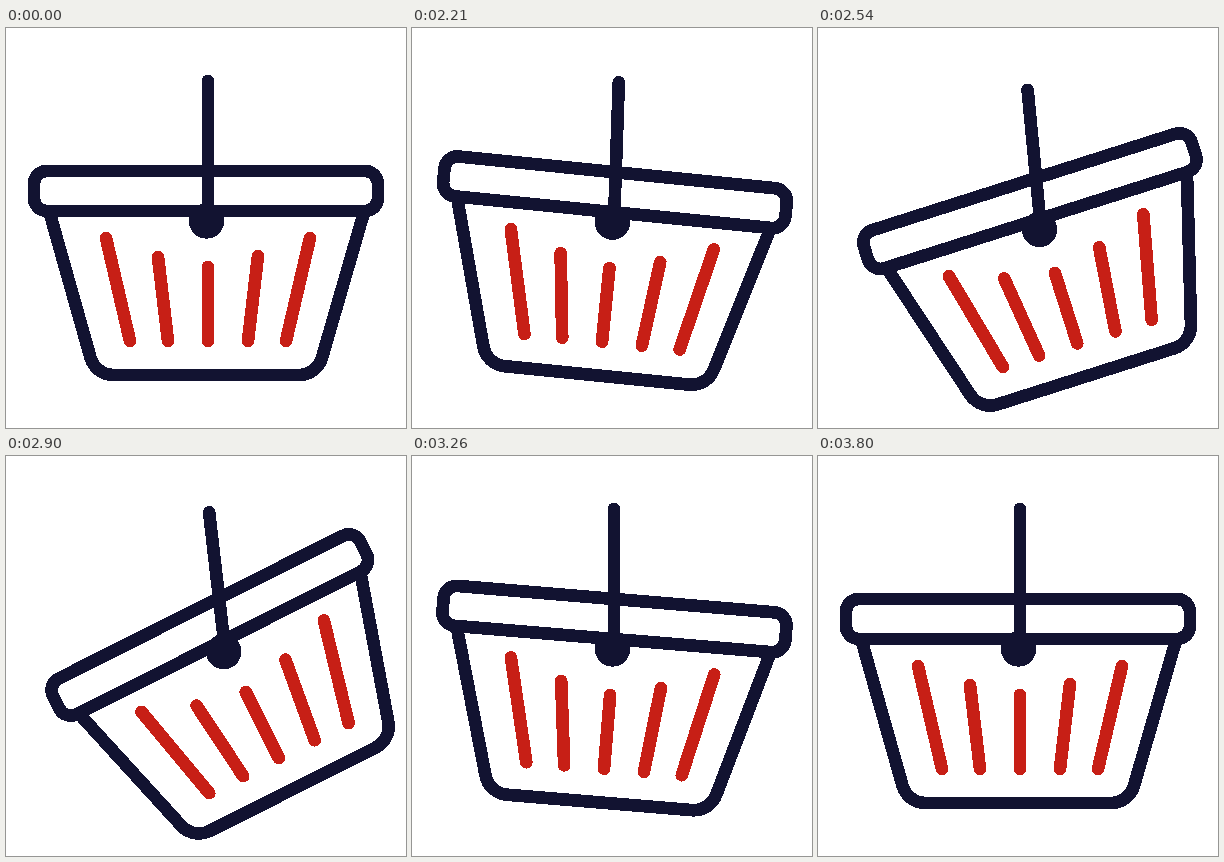
These frames come from a looping animation (400x400 px, 3830 ms). An HTML page:

```html
<!DOCTYPE html>
<html lang="en">
<head>
<meta charset="utf-8">
<title>Swinging basket</title>
<style>
  html, body { margin: 0; width: 100%; height: 100%; overflow: hidden; background: #fff; }
  svg { display: block; width: 100vw; height: 100vh; shape-rendering: crispEdges; }
  .line { fill: none; stroke: #121331; stroke-width: 12.7; stroke-linecap: round; stroke-linejoin: round; }
  .slat { stroke: #c71f16; }
</style>
</head>
<body>
<svg viewBox="0 0 400 400">
  <g id="whole">
    <g id="basket">
      <path class="line" d="M44 186 L84.5 329.7 A24 24 0 0 0 107.5 347 H293 A24 24 0 0 0 316 329.7 L357.5 186"/>
      <rect class="line" x="28" y="143" width="344" height="40" rx="13"/>
      <path class="line slat" d="M100 210 L124 313 M152 229 L162 313 M202 239 V313 M252 228 L242 313 M304 210 L280 313"/>
    </g>
    <path id="handle" class="line" d="M202 53 V190"/>
    <circle cx="200.5" cy="193" r="17.7" fill="#121331"/>
  </g>
</svg>
<script>
const LOOP = 3830, START = 2030, STEP = 30;
const PIVOT = "200.5 193";
const byId = id => document.getElementById(id);
const whole = byId("whole"), basket = byId("basket"), handle = byId("handle");

// Eases from 0 to 1 between two times.
function ease(t, from, to) {
  const u = Math.min(1, Math.max(0, (t - from) / (to - from)));
  return u * u * (3 - 2 * u);
}

// Eases out to 1 and later back to 0.
const swing = (t, from, peak, leave, back) => ease(t, from, peak) - ease(t, leave, back);

function draw(time) {
  const t = time < START ? 0 : START + Math.floor((time - START) / STEP) * STEP;
  const x = 21.5 * swing(t, 2246, 2569, 2780, 3199);
  const y = 9.4 * swing(t, 2150, 2420, 2390, 3170);
  const basketTurn = 7 * swing(t, 1970, 2300, 3450, 3800) - 37 * swing(t, 2300, 2692, 2800, 3341);
  const handleTurn = 2 * swing(t, 1970, 2230, 2780, 3230) - 10 * swing(t, 2279, 2667, 2780, 3230);
  whole.setAttribute("transform", `translate(${x} ${y})`);
  basket.setAttribute("transform", `rotate(${basketTurn} ${PIVOT})`);
  handle.setAttribute("transform", `rotate(${handleTurn} ${PIVOT})`);
}

const begin = performance.now();
function tick() {
  draw((performance.now() - begin) % LOOP);
  requestAnimationFrame(tick);
}
tick();
</script>
</body>
</html>
```
